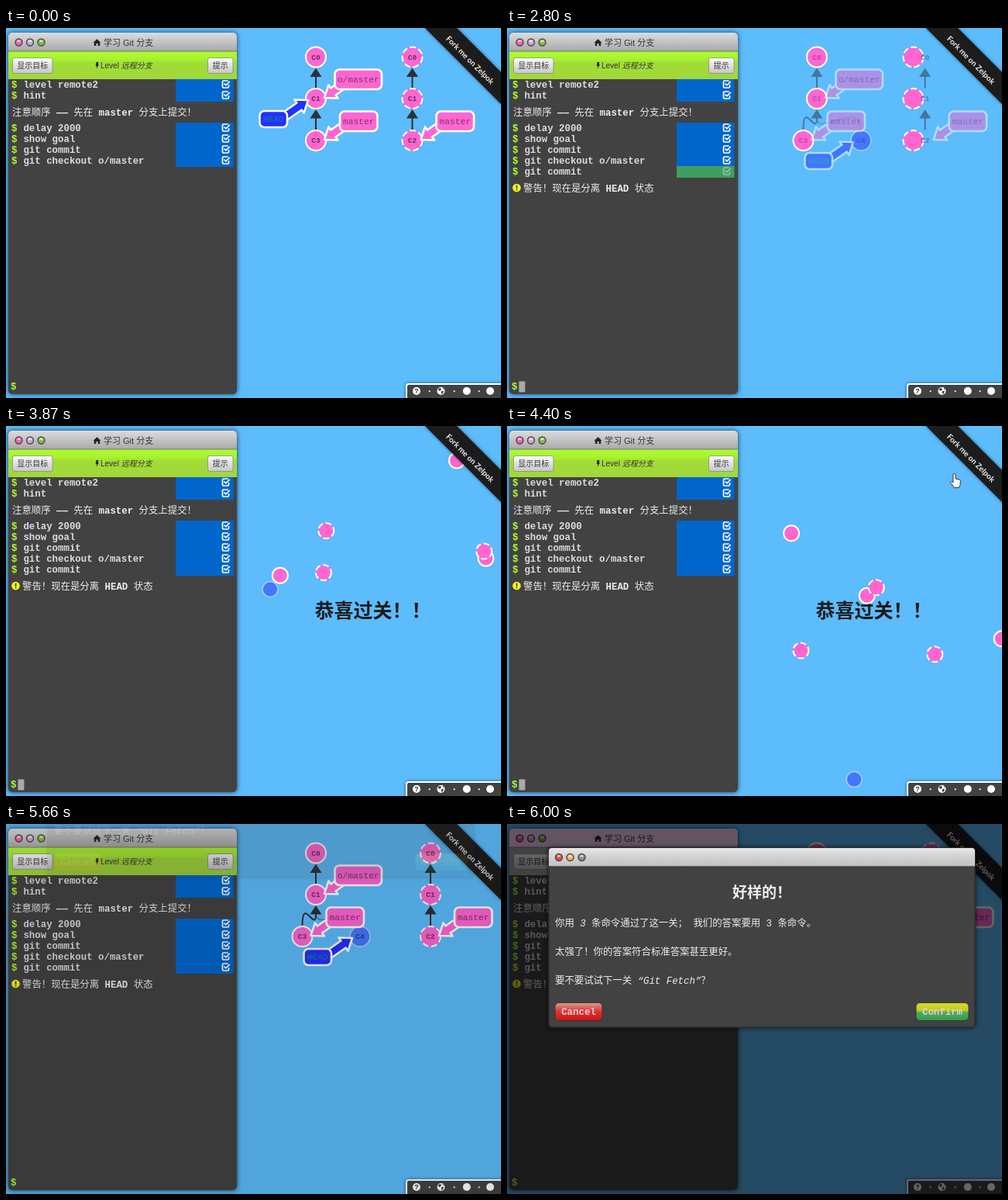
An HTML page that plays this animation: 639 by 477 pixels, repeating every 7180 ms.

```html
<!DOCTYPE html>
<html lang="zh-CN">
<head>
<meta charset="utf-8">
<title>学习 Git 分支</title>
<style>
html, body { margin: 0; width: 100%; height: 100%; overflow: hidden; background: #5cbcfc; }
svg { display: block; width: 639px; height: 477px; }
text { white-space: pre; font-family: "Liberation Mono", "Noto Sans CJK SC", "Noto Sans CJK", monospace; font-size: 12.4px; fill: #eee; }
.ui { font-family: "Liberation Sans", "Noto Sans CJK SC", "Noto Sans CJK", sans-serif; fill: #333; }
.b { font-weight: bold; }
.i { font-style: italic; }
.cmd { fill: #ddd; font-weight: bold; }
.p { fill: #adff2f; font-weight: bold; }
.mid { text-anchor: middle; }
.node { font-size: 9.5px; font-weight: bold; fill: #65305a; text-anchor: middle; }
.tag text { font-size: 11.2px; fill: #83306c; text-anchor: middle; }
.tag path, .tag rect { stroke: #fff; stroke-width: 2.6; stroke-linejoin: round; }
.edge { fill: none; stroke: #2b3036; stroke-width: 2; }
</style>
</head>
<body>
<svg id="stage" viewBox="0 0 639 477">
  <defs>
    <linearGradient id="chrome" x2="0" y2="1"><stop stop-color="#dcdcdc"/><stop offset="1" stop-color="#a9a9a9"/></linearGradient>
    <linearGradient id="chrome2" x2="0" y2="1"><stop stop-color="#e8e8e8"/><stop offset=".45" stop-color="#d2d2d2"/><stop offset="1" stop-color="#c2c2c2"/></linearGradient>
    <linearGradient id="lime" x2="0" y2="1"><stop stop-color="#adff2f"/><stop offset=".3" stop-color="#a8f02f"/><stop offset=".42" stop-color="#a2dc38"/><stop offset="1" stop-color="#a0d838"/></linearGradient>
    <linearGradient id="btn" x2="0" y2="1"><stop stop-color="#fbfbfb"/><stop offset="1" stop-color="#c6c6c6"/></linearGradient>
    <linearGradient id="red" x2="0" y2="1"><stop stop-color="#d9a08c"/><stop offset=".2" stop-color="#d87468"/><stop offset=".45" stop-color="#e0383a"/><stop offset="1" stop-color="#cc1212"/></linearGradient>
    <linearGradient id="green" x2="0" y2="1"><stop stop-color="#d2dc28"/><stop offset=".42" stop-color="#c2cc22"/><stop offset=".55" stop-color="#4cab58"/><stop offset="1" stop-color="#369a50"/></linearGradient>
    <filter id="shade" x="-10%" y="-10%" width="120%" height="120%"><feDropShadow dx="0" dy="0" stdDeviation="3" flood-opacity=".7"/></filter>
    <filter id="soft" x="-10%" y="-20%" width="120%" height="140%"><feDropShadow dx="0" dy="0" stdDeviation="2" flood-opacity=".5"/></filter>
    <clipPath id="paper"><rect x="306" width="333" height="477"/></clipPath>
    <clipPath id="win"><rect x="3" y="6" width="295" height="466" rx="5"/></clipPath>
    <clipPath id="box"><rect x="54" y="31" width="550" height="231" rx="4"/></clipPath>
  </defs>
  <rect width="639" height="477" fill="#5cbcfc"/>
  <g id="tree" clip-path="url(#paper)"></g>
  <g id="term"></g>
  <g id="extras"></g>
  <rect id="dim" width="639" height="477"/>
  <g id="dialog"></g>
  <path id="hand" d="M576 70V63q0-1.600 1.500-1.600t1.500 1.600v5l5 1q1.500.4 1.500 2.200 0 5-2 8.300h-6q-2.500-3.500-5.300-7 .8-1.900 3.800.5z" fill="#fff" stroke="#333" stroke-width="1"/>
</svg>
<script>
const LOOP = 7180, BOOM = 2870, MID = 3460, LATE = 4400, BACK = 5100;
const PINK = '#ff66d2', BLUE = '#4477ff', GRAVITY = .0005;
const $ = id => document.getElementById(id);
const ramp = (t, a, b) => Math.min(1, Math.max(0, (t - a) / (b - a)));
const out = p => 1 - (1 - p) ** 2;
const smooth = p => p * p * (3 - 2 * p);
const mix = (a, b, p) => a + (b - a) * p;
const set = (id, attrs) => { for (const k in attrs) $(id).setAttribute(k, attrs[k]); };
const text = (x, y, s, cls = '', more = '') => `<text x="${x}" y="${y}" class="${cls}" ${more}>${s}</text>`;
const rect = (x, y, w, h, fill, more = '') => `<rect x="${x}" y="${y}" width="${w}" height="${h}" fill="${fill}" ${more}/>`;
const lamp = (x, y, fill) => `<circle cx="${x}" cy="${y}" r="4.500" fill="${fill}" stroke="#4a4a4a" stroke-width="1.400"/>
  <ellipse cx="${x}" cy="${y - 1.6}" rx="2.300" ry="1.300" fill="#fff" opacity=".65"/>`;

// Terminal
const tick = y => `<path d="M287.500 ${y + 1}v2.800q0 1.200-1.200 1.200h-5.600q-1.200 0-1.200-1.200v-6.600q0-1.200 1.200-1.200h6M281.500 ${y - .5}l2.300 2.300 5-5"
  fill="none" stroke="#fff" stroke-width="1.700"/>`;
const row = (y, cmd, id = '') => `<g id="row${id}">${rect(219, y, 74.5, 15, '#0066cc', `id="fill${id}"`)}
  <g id="tick${id}">${tick(y + 6)}</g>${text(7, y + 11, '$', 'p')}${text(22.4, y + 11, cmd, 'cmd')}</g>`;
const rows = [[66, 'level remote2'], [80, 'hint'], [122, 'delay 2000'], [136, 'show goal'],
  [150, 'git commit'], [164, 'git checkout o/master']];
const button = (x, w, s) => rect(x, 38.5, w, 20, 'url(#btn)', 'rx="2.500" stroke="#8a8a8a" stroke-width=".8"') +
  text(x + w / 2, 52.3, s, 'ui mid', 'style="font-size:10px"');

$('term').innerHTML = `
  ${rect(3, 6, 295, 466, '#424242', 'rx="5" filter="url(#shade)"')}
  <g clip-path="url(#win)">
    ${rect(3, 6, 295, 24, 'url(#chrome)')}${rect(3, 30, 295, 36, 'url(#lime)')}
    <g id="tint">${rect(3, 6, 295, 24, '#fad4f5')}${rect(3, 30, 295, 36, '#a5a5a5')}</g>
    ${rect(3, 29.5, 295, 1, '#777')}
  </g>
  ${lamp(16.5, 18.5, '#f25fae')}${lamp(31, 18.5, '#c9a9c2')}${lamp(45.5, 18.5, '#7fbf3f')}
  <path d="M112.500 19l5-4.800 5 4.800h-1.300v4h-2.500v-3h-2.400v3h-2.500v-4z" fill="#222"/>
  ${text(126, 23, '学习 Git 分支', 'ui', 'style="font-size:11px"')}
  ${button(8.5, 51.5, '显示目标')}${button(260.5, 32.5, '提示')}
  <path d="M116.500 44h3l-1 3h1.500l-3.500 6 .8-4h-1.600z" fill="#222"/>
  ${text(122, 52, 'Level <tspan class="i">远程分支</tspan>', 'ui', 'style="font-size:10px"')}
  ${rows.map(r => row(...r)).join('')}
  ${text(8, 113.3, '注意顺序 <tspan class="b">——</tspan> 先在 <tspan class="b">master</tspan> 分支上提交！')}
  ${row(178, 'git commit', 'New')}
  <g id="warn"><circle cx="12.500" cy="206" r="5.300" fill="#f5f51e"/>${rect(11.7, 202.7, 1.7, 4, '#333')}${rect(11.7, 207.6, 1.7, 1.7, '#333')}
    ${text(21, 210.6, '警告！现在是分离 <tspan class="b">HEAD</tspan> 状态')}</g>
  ${text(6, 465.8, '$', 'p')}${text(15.4, 465.8, '', 'cmd', 'id="typed"')}
  ${rect(15.4, 455.5, 8, 14, '#aaa', 'id="caret"')}`;

// Ribbon and social bar
const dot = x => `<circle cx="${x}" cy="468.300" r="1.100" fill="#fff"/>`;
const disc = x => `<circle cx="${x}" cy="468" r="5" fill="#fff"/>`;
$('extras').innerHTML = `
  <path d="M540-1h41l60 60v41z" fill="#1a1a1a" filter="url(#soft)"/>
  ${text(0, 3.4, 'Fork me on Zelpok', 'mid b', 'transform="translate(599 41.500) rotate(45)" style="font-family:Lato,sans-serif;font-size:10px"')}
  <path d="M517 480v-18q0-3 3-3h122v21z" fill="#424242" stroke="#fff" stroke-width="2" filter="url(#soft)"/>
  ${disc(530)}${text(530, 471.4, '?', 'mid b', 'style="font-size:9px;fill:#333"')}
  ${dot(546.7)}${disc(561.5)}<path d="M558 465l3-1 1 2-2 2-2-1zM562 468l3 0-1 3-2 1zM564 464l1.500 2-1.500 0z" fill="#444"/>
  ${dot(578.7)}${disc(594.8)}${dot(610.7)}${disc(625)}`;

// Dialog
const pill = (x, w, fill, s) => rect(x, 230.5, w, 23, fill, 'rx="5" stroke="#2b2b2b" stroke-width=".800"') +
  text(x + w / 2, 246, s, 'mid b', 'style="fill:#e3cfdc"');
$('dialog').innerHTML = `
  ${rect(54, 31, 550, 231, '#424242', 'rx="4" stroke="#2c2c2c" stroke-width="1.500" filter="url(#shade)"')}
  <g clip-path="url(#box)">${rect(54, 31, 550, 23.5, 'url(#chrome2)')}${rect(54, 54, 550, 1, '#666')}</g>
  ${lamp(67, 43, '#f0443c')}${lamp(81.5, 43, '#f3b25a')}${lamp(96.5, 43, '#8c8c8c')}
  ${text(291, 95, '好样的！', 'b', 'style="font-size:19px"')}
  ${text(62, 131.5, '你用 <tspan class="i">3</tspan> 条命令通过了这一关； 我们的答案要用 3 条命令。')}
  ${text(62, 168.5, '太强了！你的答案符合标准答案甚至更好。')}
  ${text(62, 205.8, '要不要试试下一关 <tspan class="i">“Git Fetch”</tspan>？')}
  ${pill(62, 61, 'url(#red)', 'Cancel')}${pill(528, 68, 'url(#green)', 'Confirm')}`;

// Commit trees. flight: two unfolded waypoints (at MID and LATE) of the bouncing balls
const nodes = [
  { name: 'C0', y: 37.5, flight: [82.5, 68.5, -298.5, 138] },
  { name: 'C1', y: 91, flight: [538.5, 230, 813, 218.5] },
  { name: 'C3', y: 145, flight: [-17, 226, -692, 274] },
  { name: 'C4', y: 145, flight: [354, 117, 164, 455], blue: true },
  { name: 'C0', y: 37.5, flight: [439.5, 112, 379.5, 289], far: true },
  { name: 'C1', y: 91, flight: [552, 222, 801, 208], far: true },
  { name: 'C2', y: 145, flight: [312.5, 204, 60, 294], far: true },
];
const tag = (id, s, x, y, w, h, tip, fill, ink = '') => `<g class="tag" id="${id}" fill="${fill}">
  <path d="M0 0L14-10.500V-5.500H38V5.500H14V10.500z" transform="translate(${tip})"/>
  ${rect(x, y, w, h, fill, 'rx="6"')}${text(x + w / 2, y + h / 2 + 3.4, s, '', ink)}</g>`;
const pinkTag = (id, s, x, w) => tag(id, s, x, -37.5, w, 25.5, '11 -1) rotate(-35', PINK);
const tipUp = (x, y) => `<path d="M${x} ${y + 14}l7.500 11.500h-15z" fill="#2b3036"/>`;
const edge = (x, y) => `<path class="edge" d="M${x} ${y + 24}V${y + 40}"/>${tipUp(x, y)}`;
const ball = (n, i) => `<circle id="ball${i}" fill="${n.blue ? BLUE : PINK}" stroke="${n.blue ? '#a6d0ff' : '#fff'}" stroke-width="${n.blue ? 1.5 : 2}"
  ${n.far ? 'stroke-dasharray="8 3.500"' : ''}/>`;

$('tree').innerHTML = `
  <g id="edges">${edge(400, 37.5)}
    <path class="edge" id="edge4" style="stroke:#4486bd"/><path class="edge" id="edge3"/>${tipUp(400, 91)}
    <g id="farEdges">${edge(0, 37.5)}${edge(0, 91)}</g></g>
  ${text(398.5, 246.5, '恭喜过关！！', 'b', 'id="cheer" style="font-size:25px;fill:#1c1c1c"')}
  ${nodes.map(ball).join('')}
  <g id="names">${nodes.map((n, i) => text(0, 0, n.name, 'node', `id="name${i}"` + (n.blue ? ' style="fill:#1c3f9c"' : ''))).join('')}</g>
  <g id="tags">
    ${pinkTag('tagOrigin', 'o/master', 24.5, 60.5)}${pinkTag('tagMaster', 'master', 31, 48.5)}${pinkTag('tagFar', 'master', 31, 48.5)}
    ${tag('tagHead', 'HEAD', -72.5, 16, 35.5, 21, '-10 2) rotate(145', '#2330ff', 'style="fill:#12808a"')}
  </g>`;

const fold = x => {
  const m = (((x - 306) % 666) + 666) % 666;
  return 306 + Math.min(m, 666 - m);
};
function flying(n, home, t) {
  const [x1, y1, x2, y2] = n.flight;
  const [ta, xa, ya, tb, xb, yb] = t < MID ? [BOOM, ...home, MID, x1, y1] : [MID, x1, y1, LATE, x2, y2];
  const p = (t - ta) / (tb - ta);
  const y = mix(ya, yb, p) + GRAVITY / 2 * (t - ta) * (t - tb);
  return [fold(mix(xa, xb, p)), y > 467 ? 467 - (y - 467) * .6 : Math.max(19, y)];
}

const keys = [[520, 1], [980, 3], [1100, 4], [1210, 6], [1420, 7], [1500, 8], [1580, 9], [1660, 10], [1960, 0]];

function drawTerm(t) {
  const n = keys.reduce((len, [at, k]) => t >= at ? k : len, 0);
  $('typed').textContent = 'git commit'.slice(0, n);
  set('caret', { x: 15.4 + n * 7.44, opacity: +(t >= 170 && t < 5500) });
  const done = ramp(t, 2540, 3190);
  set('rowNew', { opacity: +(t >= 1960) });
  set('fillNew', { fill: `rgb(${[[107, 0], [195, 102], [21, 204]].map(([a, b]) => Math.round(mix(a, b, done)))})` });
  set('tickNew', { opacity: done });
  set('warn', { opacity: +(t >= 2230) });
}

function drawTree(t) {
  const grow = smooth(ramp(t, 2170, 2620));
  const farX = 524.5 + 23.5 * out(ramp(t, 2700, 2950));
  const home = smooth(ramp(t, BACK, 5500));
  const shown = 1 - ramp(t, 2700, 2900) + ramp(t, 5150, 5500);
  const x3 = mix(400, 382.5, grow), x4 = mix(400, 457, grow), y4 = mix(91, 145, grow);
  const r = 13 - 3 * (ramp(t, BOOM, 3100) - home);

  nodes.forEach((n, i) => {
    const spot = n.far ? [farX, n.y] : n.blue ? [x4, y4] : [i === 2 ? x3 : 400, n.y];
    set('name' + i, { x: spot[0], y: spot[1] + 3.2, opacity: n.blue ? grow : 1 });
    const rest = n.far && t < BACK ? [524.5, n.y] : spot;
    const from = t > BOOM ? flying(n, rest, Math.min(t, BACK)) : rest;
    set('ball' + i, { cx: mix(from[0], spot[0], home), cy: mix(from[1], spot[1], home), r, opacity: n.blue ? grow : 1 });
  });
  for (const id of ['edges', 'names', 'tags']) set(id, { opacity: shown });
  set('edge3', { d: `M${x3} 131C${x3} 92 400 141 400 116` });
  set('edge4', { d: `M${x4} ${y4 - 14}C${x4} 92 400 141 400 116`, opacity: grow });
  set('farEdges', { transform: `translate(${farX})` });
  const place = (id, x, y) => set(id, { transform: `translate(${x} ${y})` });
  place('tagOrigin', 400, 91);
  place('tagMaster', x3, 145);
  place('tagFar', farX, 145);
  place('tagHead', x4, y4);
  set('cheer', { opacity: ramp(t, 3100, 3650) - ramp(t, 4980, 5180) });
}

function drawDialog(t) {
  const p = ramp(t, 5585, 5960);
  set('dim', { opacity: .6 * p });
  set('tint', { opacity: ramp(t, 5800, 5960) });
  set('dialog', { opacity: p ** 1.4, transform: `translate(0 ${-303 * (1 - out(p))})` });
  set('hand', { opacity: +(t >= 4000 && t < 4800) });
}

const start = performance.now();
function frame() {
  const t = (performance.now() - start) % LOOP;
  drawTerm(t);
  drawTree(t);
  drawDialog(t);
  requestAnimationFrame(frame);
}
frame();
</script>
</body>
</html>
```
